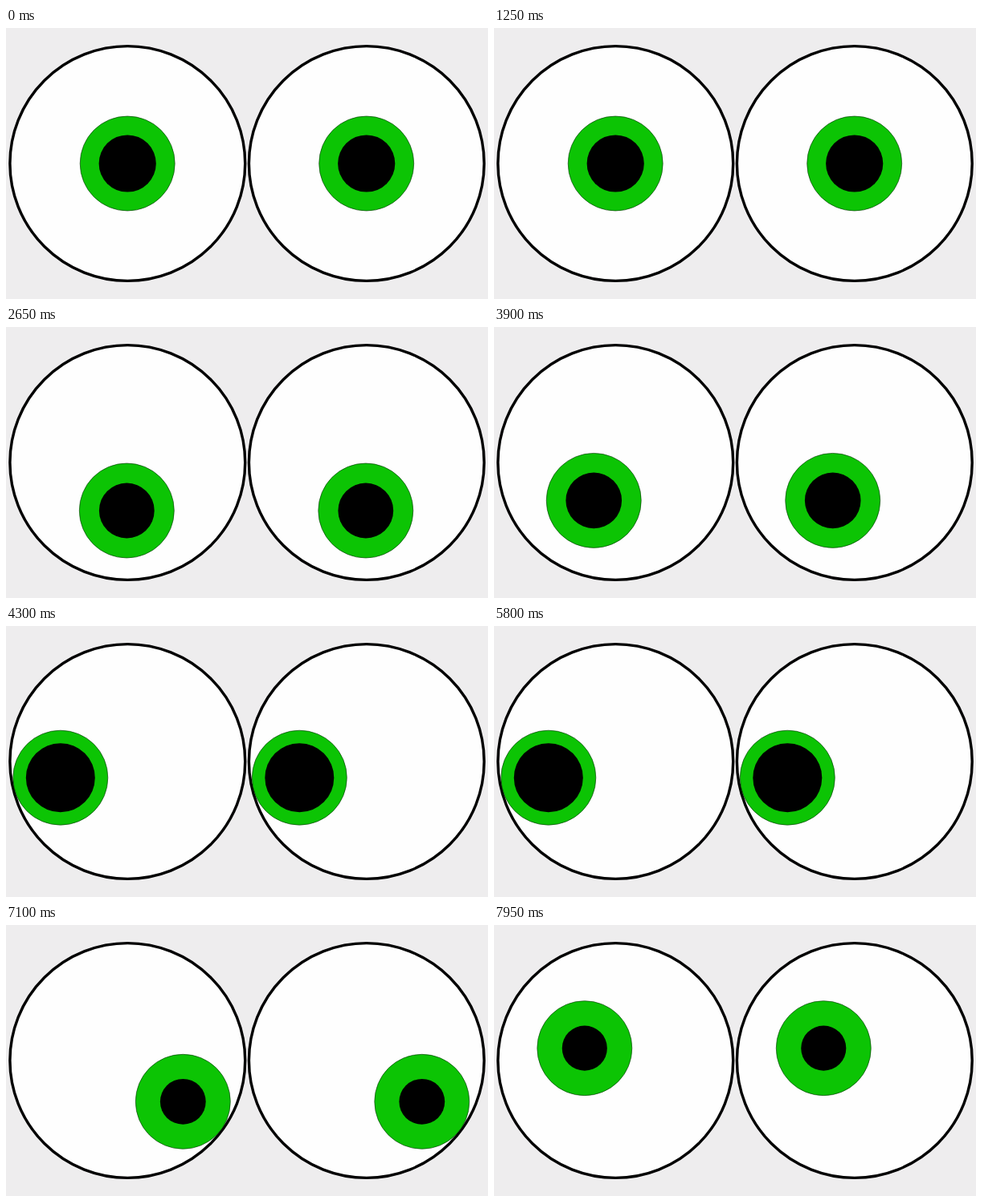
An HTML page that plays this animation: 600 by 338 pixels, repeating every 8000 ms.

```html
<!DOCTYPE html>
<html lang="en">
<head>
<meta charset="utf-8">
<title>Eyes</title>
<style>
  html, body { margin: 0; width: 100%; height: 100%; overflow: hidden; background: #eeedee; }
  svg { display: block; width: 100%; height: 100%; }
  .ball { fill: #fefefe; stroke: #000; stroke-width: 3.4; }
  .iris { fill: #0cc404; stroke: #042c02; stroke-width: 0.6; }
</style>
</head>
<body>
<svg viewBox="0 0 600 338">
  <defs>
    <g id="eye">
      <circle class="ball" cx="151.3" cy="169" r="146.4"/>
      <g id="gaze">
        <circle class="iris" r="59"/>
        <circle id="pupil" r="35.5"/>
      </g>
    </g>
  </defs>
  <use href="#eye"/>
  <use href="#eye" x="297.5"/>
</svg>
<script>
  const LOOP = 8000, STEP = 50;
  const LOOK_MS = 200, PUPIL_MS = 500;

  // Each look: when it starts, where the iris goes, pupil radius.
  const looks = [
    { at: -1000, x: 151.2, y: 169, r: 35.6 },
    { at: 1822, x: 150.3, y: 229, r: 34.4 },
    { at: 3822, x: 67.8, y: 189.2, r: 43 },
    { at: 5822, x: 220.3, y: 220.3, r: 28.4 },
    { at: 7822, x: 73, y: 129, r: 25.8 }
  ];

  const gaze = document.getElementById('gaze');
  const pupil = document.getElementById('pupil');

  // cubic-bezier(.42, 0, .58, 1), solved by bisection
  function easeInOut(p) {
    if (p <= 0) return 0;
    if (p >= 1) return 1;
    let lo = 0, hi = 1, s = 0.5;
    for (let i = 0; i < 24; i++) {
      s = (lo + hi) / 2;
      const q = 1 - s;
      const x = 1.26 * s * q * q + 1.74 * s * s * q + s * s * s;
      if (x < p) lo = s; else hi = s;
    }
    return s * s * (3 - 2 * s);
  }

  function valueAt(key, t, duration) {
    let v = looks[0][key];
    for (const look of looks) {
      v += (look[key] - v) * easeInOut((t - look.at) / duration);
    }
    return v;
  }

  function draw(t) {
    const x = valueAt('x', t, LOOK_MS), y = valueAt('y', t, LOOK_MS);
    gaze.setAttribute('transform', `translate(${x.toFixed(2)} ${y.toFixed(2)})`);
    pupil.setAttribute('r', valueAt('r', t, PUPIL_MS).toFixed(2));
  }

  let start = null;
  function tick(now) {
    if (start === null) start = now;
    const t = (now - start) % LOOP;
    draw(Math.floor(t / STEP) * STEP);
    requestAnimationFrame(tick);
  }

  draw(0);
  requestAnimationFrame(tick);
</script>
</body>
</html>
```
